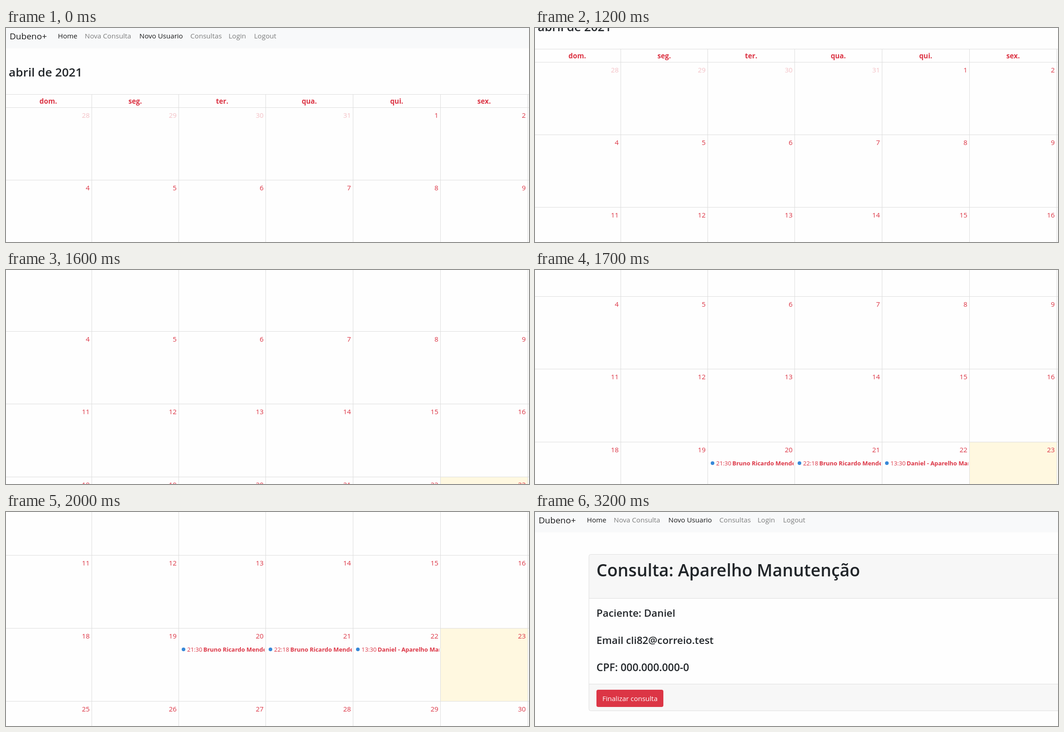
An HTML page for the animation above (6400 ms loop, 1149x472 px).

```html
<!DOCTYPE html>
<html lang="pt-BR">
<head>
<meta charset="utf-8">
<title>Agenda de consultas</title>
<style>
  html, body { margin: 0; width: 100%; height: 100%; overflow: hidden; background: #fefefe; }
  svg { display: block; width: 1149px; height: 472px; font-family: "Open Sans", "Noto Sans", sans-serif; }
</style>
</head>
<body>
<svg id="stage" viewBox="0 0 1149 472"></svg>
<script>
const LOOP = 6400, HOVER_AT = 2400, DETAIL_AT = 3200;
// Wheel scroll, sampled every 100 ms
const SCROLL_START = 1000, STEP = 100;
const OFFSETS = [23, 97, 100, 102, 177, 198, 200, 277, 300, 350, 400];

const RED = '#dc3545', INK = '#212529', LINE = '#dddddd';
const COLS = [-3, 188, 379, 570, 762, 954, 1146];
const ROWS = [175, 335, 495, 656, 817];
const DAYS = ['dom.', 'seg.', 'ter.', 'qua.', 'qui.', 'sex.'];
const EVENTS = [
  [2, '21:30', 'Bruno Ricardo Mendes'],
  [3, '22:18', 'Bruno Ricardo Mendes'],
  [4, '13:30', 'Daniel - Aparelho Manutenção']
];

const stage = document.getElementById('stage');

function add(parent, tag, attrs = {}, content = '') {
  const el = document.createElementNS('http://www.w3.org/2000/svg', tag);
  for (const key in attrs) el.setAttribute(key, attrs[key]);
  el.textContent = content;
  parent.appendChild(el);
  return el;
}
const rect = (parent, x, y, width, height, fill, more = {}) =>
  add(parent, 'rect', { x, y, width, height, fill, ...more });
const text = (parent, x, y, size, fill, content, more = {}) =>
  add(parent, 'text', { x, y, 'font-size': size, fill, ...more }, content);

function drawNav(parent) {
  rect(parent, 0, 0, 1149, 45, '#f8f9fa');
  text(parent, 8, 25, 19, '#1a1a1b', 'Dubeno+');
  const items = [[114, 'Home', 1], [173, 'Nova Consulta'], [293, 'Novo Usuario', 1],
    [405, 'Consultas'], [489, 'Login'], [545, 'Logout']];
  for (const [x, label, active] of items)
    text(parent, x, 23, 15.1, active ? '#18191a' : '#7c7d7d', label);
}

function drawEvent(parent, [col, time, title]) {
  const x = COLS[col], y = ROWS[3], width = COLS[col + 1] - x - 5;
  const clip = add(parent, 'clipPath', { id: 'cell' + col });
  rect(clip, x + 3, y + 35, width, 24, '#000');
  const box = add(parent, 'g', { 'clip-path': `url(#cell${col})` });
  const hover = rect(box, x + 3, y + 35, width, 24, '#e3e3e3', { rx: 3, visibility: 'hidden' });
  add(box, 'circle', { cx: x + 11, cy: y + 47, r: 4, fill: '#3788d8' });
  text(box, x + 19, y + 52, 13, RED, time);
  text(box, x + 54.5, y + 52, 12.9, RED, title, { 'font-weight': 700 });
  return hover;
}

function drawCalendar(parent) {
  drawNav(parent);
  text(parent, 6, 107, 26.1, INK, 'abril de 2021', { 'font-weight': 600 });
  rect(parent, 955, ROWS[3] + 1, 191, 160, '#fff8e0');
  for (const y of [146, ...ROWS]) rect(parent, 0, y, 1149, 1, LINE);
  for (const x of COLS.slice(1)) rect(parent, x, 146, 1, 740, LINE);

  DAYS.forEach((day, col) => {
    text(parent, (COLS[col] + COLS[col + 1]) / 2 + 0.3, 167, 15.3, RED, day,
      { 'font-weight': 700, 'text-anchor': 'middle' });
    ROWS.forEach((y, row) => {
      const date = row * 7 + col - 3;
      text(parent, COLS[col + 1] - 4, y + 23, 15.1, RED, date > 0 ? date : date + 31,
        { 'text-anchor': 'end', opacity: date > 0 ? 1 : 0.3 });
    });
  });
  return EVENTS.map(event => drawEvent(parent, event)).pop();
}

function drawDetail(parent) {
  const bold = { 'font-weight': 600 };
  drawNav(parent);
  rect(parent, 118.5, 93.5, 1100, 345, '#f7f7f7', { rx: 4, stroke: '#dfdfdf' });
  rect(parent, 119, 190, 1030, 190, LINE);
  rect(parent, 119, 191, 1030, 188, '#fefefe');
  text(parent, 135, 142, 37.4, INK, 'Consulta: Aparelho Manutenção', bold);
  text(parent, 135, 231, 22.3, INK, 'Paciente: Daniel', bold);
  text(parent, 135, 291, 22.3, INK, 'Email cli82@correio.test', bold);
  text(parent, 135, 351, 22.9, INK, 'CPF: 000.000.000-0', bold);
  rect(parent, 135, 392, 147, 38, RED, { rx: 4 });
  text(parent, 148, 417, 15, '#fff', 'Finalizar consulta');
}

const calendar = add(stage, 'g');
const hover = drawCalendar(calendar);
const detail = add(stage, 'g');
drawDetail(detail);

function scrollAt(t) {
  if (t < SCROLL_START) return 0;
  const i = Math.floor((t - SCROLL_START) / STEP);
  return OFFSETS[Math.min(i, OFFSETS.length - 1)];
}

function render(t) {
  const open = t >= DETAIL_AT;
  calendar.setAttribute('display', open ? 'none' : 'inline');
  detail.setAttribute('display', open ? 'inline' : 'none');
  calendar.setAttribute('transform', `translate(0 ${-scrollAt(t)})`);
  hover.setAttribute('visibility', t >= HOVER_AT ? 'visible' : 'hidden');
}

const start = performance.now();
function tick() {
  render((performance.now() - start) % LOOP);
  requestAnimationFrame(tick);
}
render(0);
requestAnimationFrame(tick);
</script>
</body>
</html>
```
